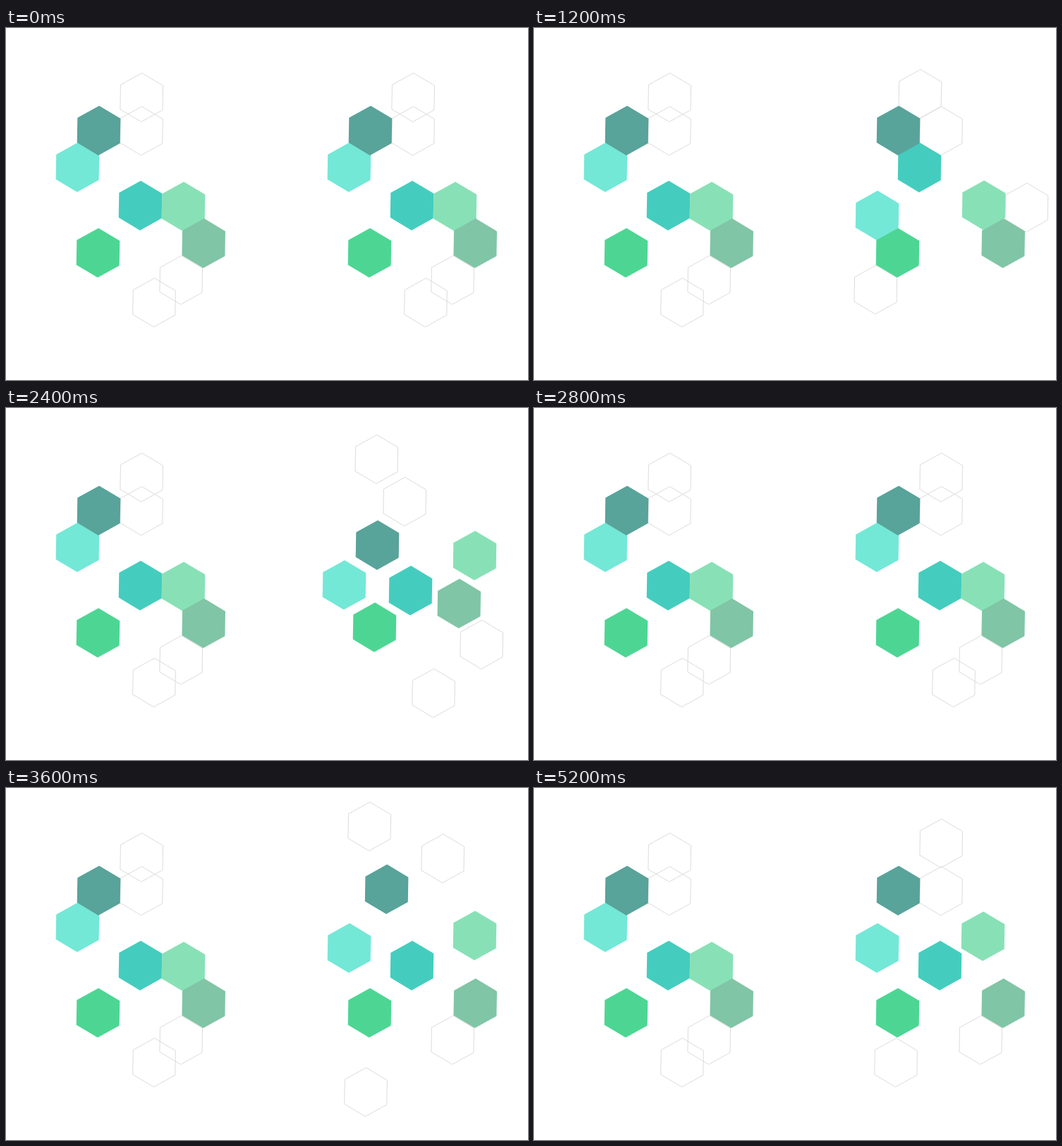
Write an HTML page with a canvas that moves like this. It is 740x500 px and loops after 5600 ms.

```html
<!DOCTYPE html>
<html lang="en">
<head>
<meta charset="utf-8">
<title>Hexagons</title>
<style>
html, body { margin: 0; width: 100%; height: 100%; overflow: hidden; background: #fff; }
canvas { display: block; }
</style>
</head>
<body>
<canvas id="stage" width="740" height="500"></canvas>
<script>
const ctx = document.getElementById('stage').getContext('2d');
const STEP = 400;
const SHIFT = 385;
const TILT = 0.95 * Math.PI / 180;

// Drawing order; a null colour means outline only
const colors = {
  top: null, second: null, right: null, bottom: null,
  light: '#88e1b6', cyan: '#73e8d7', teal: '#44cdbe',
  dark: '#58a39a', gray: '#80c5a6', green: '#4dd693'
};

const home = {
  top: [577.2, 98.6], second: [577, 146.2], right: [633.2, 358], bottom: [595, 390],
  light: [636.5, 253.6], cyan: [486.4, 197.8], teal: [575.5, 252.2],
  dark: [516.5, 145.7], gray: [665.2, 305.8], green: [515.5, 319.4]
};

const pose = (base, moves) => ({ ...base, ...moves });

const loose = pose(home, {
  top: [577.2, 78.6], bottom: [513.1, 390],
  light: [636.5, 210.6], cyan: [486.5, 227.3]
});
const rolling = pose(home, {
  top: [562.3, 78.8], right: [695.6, 358], bottom: [498.7, 382],
  light: [637, 231.2], cyan: [479.5, 247], teal: [561, 225.2]
});
const chained = pose(home, {
  top: [547.4, 93.6], right: [698.4, 255], bottom: [484.3, 371.7],
  light: [637.6, 251.7], cyan: [486.5, 266.3], teal: [546.5, 198.2]
});
const spread = pose(loose, {
  top: [515.3, 54.6], second: [619.2, 100.1], bottom: [510, 431.9],
  light: [664.5, 209.6], dark: [539.6, 143.8]
});
const gathered = pose(spread, {
  top: [525.3, 72.8], second: [565.2, 133], right: [674.2, 336], bottom: [606.1, 405],
  cyan: [479.5, 251.4], teal: [573.5, 259.3], dark: [526.5, 194.7],
  gray: [642.3, 277.8], green: [522.5, 311.5]
});

// Forward, then back again
const there = [home, loose, rolling, chained, loose, spread, gathered, home];
const steps = there.concat(there.slice(1, -1).reverse());

function hexagon(x, y, color) {
  const radius = color ? 35.2 : 34.7;
  ctx.beginPath();
  for (let i = 0; i < 6; i++) {
    const a = i * Math.PI / 3 - Math.PI / 2 + TILT;
    ctx.lineTo(x + radius * Math.cos(a), y + radius * Math.sin(a));
  }
  ctx.closePath();
  if (color) {
    ctx.fillStyle = color;
    ctx.fill();
  } else {
    ctx.strokeStyle = '#dcdcdc';
    ctx.lineWidth = 1;
    ctx.stroke();
  }
}

function drawGroup(group, dx) {
  for (const name in colors) {
    const [x, y] = group[name];
    hexagon(x + dx, y, colors[name]);
  }
}

function draw(now) {
  const step = Math.floor(now / STEP) % steps.length;
  ctx.fillStyle = '#fff';
  ctx.fillRect(0, 0, 740, 500);
  drawGroup(home, -SHIFT);
  drawGroup(steps[step], 0);
}

let start = null;
function tick(now) {
  if (start === null) start = now;
  draw(now - start);
  requestAnimationFrame(tick);
}
draw(0);
requestAnimationFrame(tick);
</script>
</body>
</html>
```
